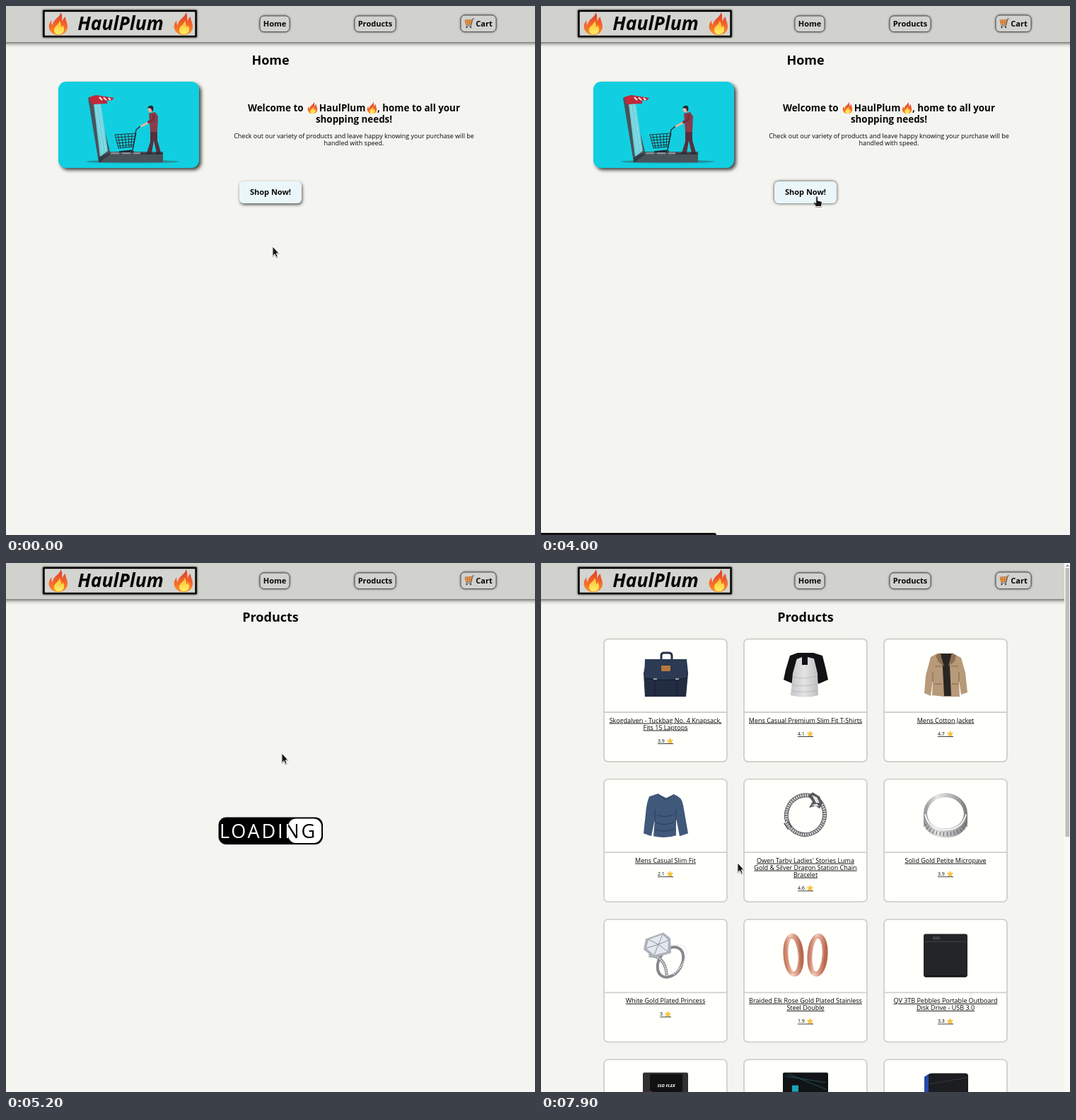
Write an HTML page that moves like this. It is 748 px wide and 748 px high and loops after 8000 ms.

```html
<!DOCTYPE html>
<html lang="en">
<head>
<meta charset="utf-8">
<title>HaulPlum</title>
<style>
html, body { margin: 0; width: 100%; height: 100%; overflow: hidden; background: #f4f5f0; }
svg { display: block; }
#stage { width: 100vw; height: 100vh; }
text { font-family: "Open Sans", "Noto Sans", sans-serif; text-anchor: middle; fill: #060606; }
.h1 { font: 700 18px "Open Sans", "Noto Sans", sans-serif; }
.h2 { font: 700 13.4px "Open Sans", "Noto Sans", sans-serif; }
.label { font: 700 11px "Open Sans", "Noto Sans", sans-serif; }
.body { font-size: 9px; }
.title { font-size: 9px; text-decoration: underline; }
.rate { font-size: 7px; text-anchor: start; }
.start { text-anchor: start; }
.end { text-anchor: end; }
.logo { font: italic 700 26.5px "Open Sans", "Noto Sans", sans-serif; }
.bar { fill: #d1d2ce; filter: drop-shadow(0 1px 3px #000c); }
.frame { fill: #d4d5d1; stroke: #000; stroke-width: 2.4; filter: drop-shadow(.5px .5px 1.5px #000); }
.nav { fill: #d1d2ce; stroke: #555; stroke-width: 1; filter: drop-shadow(0 0 1.5px #0009); }
.picture { fill: #11cfe0; filter: drop-shadow(3px 3px 2.5px #000b); }
.card { fill: #fffffc; stroke: #cfd1cb; stroke-width: 1.8; }
.cursor path { fill: #151515; stroke: #fff; stroke-width: .9; stroke-linejoin: round; filter: drop-shadow(.5px 1px .7px #0006); }
.loader { isolation: isolate; }
.loader text { font-size: 27px; letter-spacing: 2.8px; fill: #fff; text-anchor: start; }
.pill { fill: #fff; mix-blend-mode: difference; }

.home, .wait, .shop, .after, .shop-only, .arrow, .hand, .status, .pill, .cursor, .cta {
  animation: 8s step-end infinite;
}
.home { animation-name: home; }
.after { animation-name: after; }
.wait { animation-name: wait; }
.shop { animation-name: shop; }
.arrow { animation-name: arrow; }
.hand { animation-name: hand; }
.status { animation-name: status; }
.pill { animation-name: pill; }
.cursor { animation-name: cursor; }
.cta { fill: #eaf6fa; filter: drop-shadow(1.5px 2px 2px #000a); animation-name: cta; }

@keyframes home { 0% { opacity: 1 } 52.5%, 100% { opacity: 0 } }
@keyframes after { 0% { opacity: 0 } 52.5%, 100% { opacity: 1 } }
@keyframes wait { 0% { opacity: 0 } 52.5% { opacity: 1 } 68.75%, 100% { opacity: 0 } }
@keyframes shop { 0% { opacity: 0 } 68.75%, 100% { opacity: 1 } }
@keyframes arrow { 0% { opacity: 1 } 42.5% { opacity: 0 } 52.5%, 100% { opacity: 1 } }
@keyframes hand { 0% { opacity: 0 } 42.5% { opacity: 1 } 52.5%, 100% { opacity: 0 } }
@keyframes cta {
  0% { filter: drop-shadow(1.5px 2px 2px #000a) }
  42.5% { filter: drop-shadow(1px 1px 2px #000b) }
  45%, 100% { filter: drop-shadow(0 0 2px #000c) }
}
@keyframes status {
  0% { opacity: 0 } 47.5% { opacity: .35 } 48.75% { opacity: .75 }
  50% { opacity: 1 } 53.75% { opacity: .5 } 55%, 100% { opacity: 0 }
}
/* ease-in-out over one second, sampled ten times */
@keyframes pill {
  0% { transform: none }
  53.75% { transform: translateX(1.9px) }
  55% { transform: translateX(7.9px) }
  56.25% { transform: translateX(18.1px) }
  57.5% { transform: translateX(32.2px) }
  58.75% { transform: translateX(48.5px) }
  60% { transform: translateX(64.8px) }
  61.25% { transform: translateX(78.9px) }
  62.5% { transform: translateX(89.1px) }
  63.75% { transform: translateX(95.1px) }
  65%, 100% { transform: translateX(97px) }
}
@keyframes cursor {
  0% { transform: translate(377px, 340px) }
  13.75% { transform: translate(370px, 338px) }
  15% { transform: translate(340px, 325px) }
  16.25% { transform: translate(306px, 297px) }
  17.5% { transform: translate(292px, 262px) }
  18.75% { transform: translate(312px, 228px) }
  20% { transform: translate(372px, 216px) }
  21.25% { transform: translate(428px, 228px) }
  22.5% { transform: translate(438px, 255px) }
  23.75% { transform: translate(436px, 278px) }
  25% { transform: translate(430px, 292px) }
  26.25% { transform: translate(418px, 304px) }
  27.5% { transform: translate(400px, 313px) }
  28.75% { transform: translate(377px, 307px) }
  30% { transform: translate(361px, 296px) }
  32.5% { transform: translate(361px, 295px) }
  38.75% { transform: translate(364px, 294px) }
  40% { transform: translate(373px, 291px) }
  41.25% { transform: translate(383px, 284px) }
  42.5% { transform: translate(387px, 277px) }
  43.75% { transform: translate(389px, 272px) }
  45% { transform: translate(390px, 269px) }
  83.75% { transform: translate(389px, 269px) }
  85% { transform: translate(380px, 271px) }
  86.25% { transform: translate(358px, 279px) }
  87.5% { transform: translate(332px, 290px) }
  88.75% { transform: translate(310px, 298px) }
  90% { transform: translate(299px, 301px) }
  95% { transform: translate(289px, 316px) }
  96.25% { transform: translate(269px, 350px) }
  97.5% { transform: translate(263px, 392px) }
  98.75%, 100% { transform: translate(278px, 424px) }
}
</style>
</head>
<body>
<svg id="stage" viewBox="0 0 748 748">
  <defs>
    <linearGradient id="fire" x1="0" y1="0" x2="0" y2="1">
      <stop offset="0" stop-color="#e0392b"/><stop offset=".55" stop-color="#f4652a"/><stop offset="1" stop-color="#fb9326"/>
    </linearGradient>
    <linearGradient id="glow" x1="0" y1="0" x2="0" y2="1">
      <stop offset="0" stop-color="#fdbb2d"/><stop offset="1" stop-color="#fff06a"/>
    </linearGradient>
    <linearGradient id="silver">
      <stop offset="0" stop-color="#8e8f91"/><stop offset=".3" stop-color="#e6e6e6"/><stop offset=".65" stop-color="#b4b5b6"/><stop offset="1" stop-color="#777"/>
    </linearGradient>
    <linearGradient id="rose">
      <stop offset="0" stop-color="#c77b63"/><stop offset=".35" stop-color="#f5cdbc"/><stop offset="1" stop-color="#b9664e"/>
    </linearGradient>
    <linearGradient id="cloth">
      <stop offset="0" stop-color="#c5c6c8"/><stop offset=".5" stop-color="#e4e4e4"/><stop offset="1" stop-color="#bdbec0"/>
    </linearGradient>
    <symbol id="flame" viewBox="0 0 28 32">
      <path fill="url(#fire)" d="M17 0C18 6 6 10 6 18C4 17 4 14 4.500 11C1 15 0 19 1 23C3 29 8 32 14 32C22 32 27 27 27 20C27 14 24 12 24 6C21 8 20 11 20 13C18 9 21 4 17 0Z"/>
      <path fill="url(#glow)" d="M15 12C16 17 8 19 8 25C8 29 11 31 14.500 31C19 31 22 28 22 24C22 21 21 19 20 18C20 20 19 21 18 21C18 17 18 14 15 12Z"/>
    </symbol>
    <symbol id="star" viewBox="0 0 10 10">
      <path fill="#fcc534" stroke="#f3a82c" stroke-width=".4" d="M5 .3L6.400 3.500 9.800 3.800 7.200 6.100 8 9.500 5 7.700 2 9.500 2.800 6.100 .2 3.800 3.600 3.500Z"/>
    </symbol>
  </defs>

  <g class="home">
    <text class="h1" x="374" y="83">Home</text>
    <rect class="picture" x="74" y="107" width="199" height="122" rx="11"/>
    <ellipse cx="179" cy="220" rx="66" ry="2.500" fill="#22929f"/>
    <path fill="#49535a" d="M116 130L127 126 147 206H222V221H131Z"/>
    <path fill="#333b42" d="M131 214L145 208H222V210H147L133 221H131Z"/>
    <path fill="#6fd3df" d="M124 139L134 137 144 205 133 213Z"/>
    <path fill="none" stroke="#b7eaf0" stroke-dasharray="2 1.500" d="M127 140L137 206M131 138L141 205"/>
    <path fill="#c1283a" d="M117 129L128 126 153 130 149 134 143 133V138L121 139Z"/>
    <path stroke="#fff" stroke-width="1.800" d="M132 129L136 133M138 129.500L142 133M145 130L148 133"/>
    <path fill="#8a929a" d="M149 207H190V209.500H147Z"/>
    <g fill="none" stroke="#22262b" stroke-width=".9">
      <path d="M154 182L184 180 180 199 159 201ZM155 186L183 184M156 190L182 188M157 194L181 192M158 198L180 196M158 182L162 201M163 182L166 200M168 181L170 200M173 181L174 200M178 181L177 199"/>
      <path stroke-width="1.400" d="M190 170L184 175 179 204 160 206H181"/>
      <circle cx="162" cy="208" r="1.400"/><circle cx="178" cy="208" r="1.400"/>
    </g>
    <path fill="#57303c" d="M204 176H214L214 190 219 207 213 208 209 190 206 208H199L204 192Z"/>
    <path fill="#262a34" d="M199 207H206V209H198ZM212 207H219L220 209H212Z"/>
    <path fill="#8b3b49" d="M202 152L211 150 215 156 214 178H204Z"/>
    <path fill="none" stroke="#efb49e" stroke-width="2.600" stroke-linecap="round" d="M191 170L201 165"/>
    <path fill="none" stroke="#7a3140" stroke-width="4" stroke-linecap="round" d="M202 164L208 161 209 155"/>
    <circle cx="204.500" cy="146.500" r="3.700" fill="#efb49e"/>
    <path fill="#262a34" d="M200 144Q202 140 207 141Q210 144 207 150L205 145Z"/>

    <text class="h2 start" x="342" y="149">Welcome to</text>
    <use href="#flame" x="425" y="136" width="17" height="16.500"/>
    <text class="h2" x="475.500" y="149">HaulPlum</text>
    <use href="#flame" x="509" y="136" width="17" height="16.500"/>
    <text class="h2 end" x="642" y="149">, home to all your</text>
    <text class="h2" x="492" y="165">shopping needs!</text>
    <text class="body" x="492" y="187">Check out our variety of products and leave happy knowing your purchase will be</text>
    <text class="body" x="492" y="197">handled with speed.</text>
    <rect class="cta" x="330" y="248" width="88" height="31" rx="6"/>
    <text class="label" x="374" y="267">Shop Now!</text>
  </g>

  <text class="h1 after" x="374" y="83">Products</text>

  <g class="wait">
    <g class="loader">
      <rect x="300.500" y="359.500" width="147.500" height="38.500" rx="11"/>
      <text x="302" y="389">LOADING</text>
      <rect class="pill" x="302" y="361.500" width="47" height="34.500" rx="11"/>
    </g>
  </g>

  <g class="shop" id="cards"></g>

  <g>
    <rect class="bar" x="-9" y="-9" width="766" height="60"/>
    <rect class="frame" x="53.500" y="7" width="215" height="36"/>
    <use href="#flame" x="60" y="9" width="28" height="32"/>
    <text class="logo" x="162" y="34">HaulPlum</text>
    <use href="#flame" x="237" y="9" width="28" height="32"/>
    <rect class="nav" x="359" y="14" width="42" height="22.500" rx="6"/>
    <text class="label" x="380" y="29">Home</text>
    <rect class="nav" x="493" y="14" width="58" height="22.500" rx="6"/>
    <text class="label" x="522" y="29">Products</text>
    <rect class="nav" x="643" y="13" width="50" height="23.500" rx="6"/>
    <text class="label" x="676" y="28.500">Cart</text>
    <path fill="#f0a04a" stroke="#b9632a" stroke-width=".8" d="M649 20L659 19.500 657.500 26 650.500 26.500Z"/>
    <path fill="none" stroke="#b9632a" stroke-width=".7" d="M649.500 23H658.500M652.500 20V26M655.500 20V26"/>
    <path fill="none" stroke="#59636b" stroke-width="1.100" d="M662 18H660L657.500 28H650.500"/>
    <circle cx="651.500" cy="30" r="1.200" fill="#444"/><circle cx="657" cy="30" r="1.200" fill="#444"/>
  </g>

  <g class="shop">
    <rect x="740" width="8" height="748" fill="#f8f8f6"/>
    <rect x="741.500" y="7" width="5.500" height="380" fill="#bdbdbb"/>
    <path d="M742 5L744.500 2 747 5Z" fill="#888"/>
  </g>

  <rect class="status" x="-5" y="745" width="253" height="10" rx="3" fill="#111"/>

  <g class="cursor">
    <path class="arrow" d="M0 0V13.500L3.100 10.800 5.100 15.200 7.200 14.200 5.200 9.900 8.800 9.500Z"/>
    <path class="hand" d="M-1.300 .5Q0-.7 1.300 .5V6L6 7.200Q7.500 7.700 7.300 9.500L6.300 14.500H-1.200L-4.500 9.500Q-4.500 7.700-2.800 8.500L-1.300 10Z"/>
  </g>
</svg>

<script>
const knit = (fill, line) => `
  <path fill="${fill}" d="M21 2L9 6Q5 16 4 30L1 58 12 62 17 38 15 62Q32 66 47 61L47 36 52 62 64 58 57 18Q55 6 44 3L33 8Z"/>
  <path fill="none" stroke="${line}" d="M21 2L32 11 44 3M17 24L17 42M47 24V40M20 32Q32 37 44 31M18 43Q31 48 45 42M18 53Q31 57 45 52"/>`;

const art = {
  pack: `<path fill="none" stroke="#27334a" stroke-width="3" d="M26 11V5Q26 1 30 1H36Q41 1 41 5V11"/>
    <path fill="#222d42" d="M5 10H62L64 30 61 63H3L1 30Z"/>
    <path fill="#2c3a53" d="M3 10H62V36Q32 42 2 36Z"/>
    <path fill="none" stroke="#151d2d" d="M2 37Q32 42 62 37M17 40V62M48 40V62"/>
    <rect x="26" y="19" width="13" height="8" rx="1" fill="#b5793f"/>
    <path stroke="#9ba2ac" stroke-width="2" d="M15 38H20M46 38H51"/>`,
  tee: `<path fill="#111214" d="M21 1L10 5 4 25 1 39 15 45 22 20ZM43 1L56 5 61 25 64 39 50 45 42 20Z"/>
    <path fill="url(#cloth)" d="M22 1L14 30 11 61Q32 66 50 61L49 30 42 1Z"/>
    <path fill="#111214" d="M21 1H44L47 10 35 7 35 18H27V7L17 11Z"/>
    <path fill="none" stroke="#aaa" stroke-width=".6" d="M14 35Q30 39 48 34M13 46Q30 50 49 45M13 55Q30 58 49 54"/>`,
  coat: `<path fill="#b79a79" d="M20 2L11 7 4 33 2 58 11 62 14 40 13 61 31 63H52L51 40 54 60 63 57 60 29 54 8 43 2Z"/>
    <path fill="#292522" d="M25 2H41L38 20 40 62H30L28 22Z"/>
    <path fill="#8d7151" d="M24 1L30 20 22 14 18 5ZM41 1L36 20 45 13 47 5Z"/>
    <path fill="none" stroke="#816747" d="M17 20H26M40 20H50M16 45H27M41 45H50M14 28V42M51 28V42"/>`,
  knit: knit("#40587a", "#2b3d58"),
  chain: `<g fill="none" transform="rotate(20 32 32)">
      <ellipse cx="32" cy="32" rx="27" ry="28" stroke="#606163" stroke-width="6"/>
      <ellipse cx="32" cy="32" rx="27" ry="28" stroke="#d9d9d9" stroke-width="4" stroke-dasharray="1.800 1.400"/>
    </g>
    <path fill="#55575a" d="M36 5L42 0 52 6 56 15 52 23 46 19 37 22 42 13Z"/>
    <path fill="#e3e3e3" d="M41 4L48 7 52 15 47 15ZM40 18L48 16 51 20Z"/>
    <path stroke="#555" stroke-width="7" d="M4 42L10 51"/><path stroke="#ccc" stroke-width="4" stroke-dasharray="2 1" d="M4 42L10 51"/>`,
  band: `<path fill="url(#silver)" fill-rule="evenodd" d="M1 30A31 29 0 0 1 63 30V45Q55 64 32 64T1 45ZM6 31Q9 51 32 51T58 31A26 24 0 0 0 6 31Z"/>
    <path fill="none" stroke="#f4f4f4" stroke-width="2" d="M3 31Q8 53 32 53T61 31"/>
    <path fill="none" stroke="#696a6c" stroke-width="6" stroke-dasharray="1 4" d="M3 46Q12 59 32 59T61 46"/>`,
  gem: `<g fill="none" stroke="#85878c" stroke-width="4">
      <ellipse cx="39" cy="42" rx="16" ry="23" transform="rotate(32 39 42)"/>
      <path d="M8 33Q32 32 34 62"/>
    </g>
    <path fill="none" stroke="#e9eaed" stroke-width="2" stroke-dasharray="2 1.200" d="M8 33Q32 32 34 62M39 18Q62 15 62 28Q60 46 42 60"/>
    <path fill="#aeb2ba" d="M4 9L29 0 39 8 40 29 16 36 1 24Z"/>
    <path fill="#e4e8ee" d="M8 10L28 3 36 11 35 27 16 32 5 22Z"/>
    <path fill="none" stroke="#8991a0" d="M8 10L22 17 36 11M22 17L16 32M22 17L35 27M22 17L5 22M22 17L28 3"/>`,
  rings: [[15, -4], [49, 4]].map(([x, tilt]) => `<g fill="none" transform="rotate(${tilt} ${x} 32)">
      <ellipse cx="${x}" cy="32" rx="11" ry="27" stroke="url(#rose)" stroke-width="7"/>
      <ellipse cx="${x - 2}" cy="32" rx="9" ry="25" stroke="#d58f76" stroke-width="1"/></g>`).join(""),
  drive: `<rect x="1" y="2" width="62" height="61" rx="3" fill="#242526"/>
    <path stroke="#3f4041" d="M2 13H62"/><rect x="14" y="6" width="10" height="4" fill="#444"/>
    <path stroke="#111" stroke-width="2" d="M3 62H61"/>`,
  disk: `<rect width="64" height="60" rx="2" fill="#303032"/><rect x="10" y="2" width="46" height="58" fill="#111"/>
    <path fill="#c3272b" d="M10 26L28 33 10 40Z"/>
    <text x="33" y="20" style="font:italic 700 6px 'Open Sans',sans-serif;fill:#fff">SSD FLEX</text>`,
  dark: `<rect width="64" height="60" rx="2" fill="#111416"/><rect x="13" y="18" width="9" height="9" fill="#18a7b5"/>
    <path stroke="#244d56" d="M4 5L60 14M8 2L62 24"/>`,
  blue: `<path fill="#2449a8" d="M2 6L10 1 12 60H2Z"/><path fill="#1c1d20" d="M8 3Q10 1 13 1H60Q64 1 64 5V60H8Z"/>
    <path stroke="#34363a" d="M9 16L63 7"/>`
};

const products = [
  ["pack", "3.9", "Skogdalven - Tuckbag No. 4 Knapsack,", "Fits 15 Laptops"],
  ["tee", "4.1", "Mens Casual Premium Slim Fit T-Shirts"],
  ["coat", "4.7", "Mens Cotton Jacket"],
  ["knit", "2.1", "Mens Casual Slim Fit"],
  ["chain", "4.6", "Owen Tarby Ladies' Stories Luma", "Gold &amp; Silver Dragon Station Chain", "Bracelet"],
  ["band", "3.9", "Solid Gold Petite Micropave"],
  ["gem", "3", "White Gold Plated Princess"],
  ["rings", "1.9", "Braided Elk Rose Gold Plated Stainless", "Steel Double"],
  ["drive", "3.3", "QV 3TB Pebbles Portable Outboard", "Disk Drive - USB 3.0"],
  ["disk"], ["dark"], ["blue"]
];

function rating(value, y) {
  const half = value.length > 1 ? 11 : 8;
  return `<text class="rate" x="${87 - half}" y="${y}">${value}</text>
    <use href="#star" x="${78 + half}" y="${y - 7}" width="9" height="9"/>
    <path stroke="#111" stroke-width=".8" d="M${87 - half} ${y + 1.5}H${87 + half}"/>`;
}

function card([kind, score, ...lines], i) {
  const x = 89 + (i % 3) * 198, y = 107.5 + Math.floor(i / 3) * 198.2;
  const titles = lines.map((s, n) => `<text class="title" x="87" y="${118 + n * 10}">${s}</text>`).join("");
  return `<g transform="translate(${x} ${y})">
    <rect class="card" width="174" height="173.500" rx="6"/>
    <path stroke="#cfd1cb" stroke-width="1.800" d="M0 103.500H174"/>
    <g transform="translate(55 18.500)">${art[kind]}</g>
    ${titles}${score ? rating(score, 126.5 + lines.length * 10) : ""}</g>`;
}

document.getElementById("cards").innerHTML = products.map(card).join("");
</script>
</body>
</html>
```
